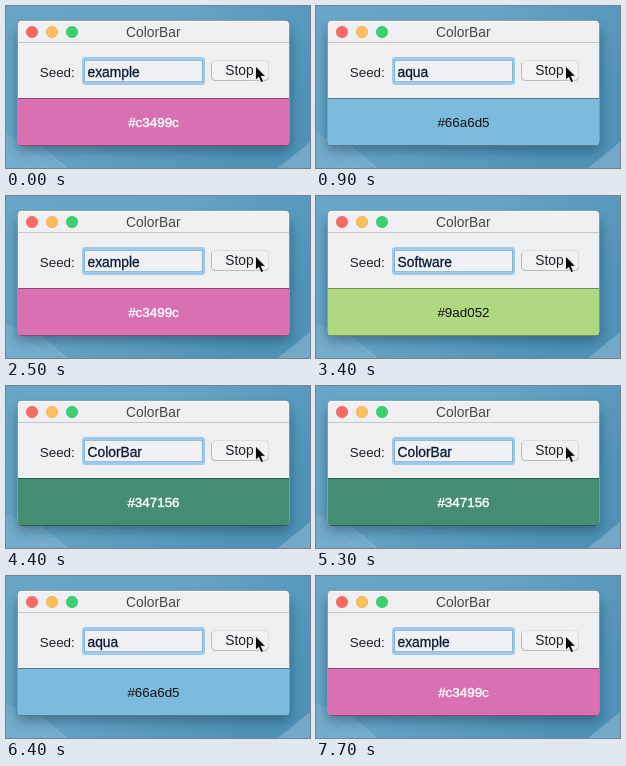
Animation, 304 px wide and 162 px high, one loop 8000 ms. Source, as an HTML page:

```html
<!DOCTYPE html>
<html lang="en">
<head>
<meta charset="utf-8">
<title>ColorBar</title>
<style>
  html, body { margin: 0; width: 100%; height: 100%; overflow: hidden; }
  svg { display: block; width: 100vw; height: 100vh; }
  text { font: 13.8px "Liberation Sans", Arial, sans-serif; fill: #202124; white-space: pre; }
  .mid { text-anchor: middle; }
  #seed { fill: #0a1c38; stroke: #0a1c38; stroke-width: .3; }
  #code { font-size: 13.4px; stroke-width: .4; }
</style>
</head>
<body>
<svg viewBox="0 0 304 162" preserveAspectRatio="none">
  <defs>
    <linearGradient id="sky" x1="0" y1="0" x2="1" y2=".5">
      <stop offset="0" stop-color="#69a5c6"/>
      <stop offset=".5" stop-color="#66a3c5"/>
      <stop offset="1" stop-color="#4f92b8"/>
    </linearGradient>
    <filter id="blur" x="-20%" y="-20%" width="140%" height="150%">
      <feGaussianBlur stdDeviation="6"/>
    </filter>
    <clipPath id="frame"><rect x="12" y="15" width="271" height="125" rx="4"/></clipPath>
    <clipPath id="inner"><rect x="79" y="54" width="116.5" height="22"/></clipPath>
  </defs>

  <rect width="304" height="162" fill="url(#sky)"/>
  <path d="M0 128L34 140 62 162H0z" fill="#8cbcd4" opacity=".35"/>
  <path d="M14 138L40 162M32 138L60 162" stroke="#a3cadd" opacity=".35"/>
  <path d="M272 162L304 136V162z" fill="#8cb8d0" opacity=".6"/>
  <rect x="11" y="23" width="273" height="122" rx="5" fill="#0b2b40" opacity=".42" filter="url(#blur)"/>

  <rect x="11.5" y="14.5" width="272" height="125" rx="4.5" fill="#eff0f2" stroke="#4f7184" stroke-opacity=".4"/>
  <g clip-path="url(#frame)">
    <rect x="12" y="15" width="271" height="21" fill="#f0f0f2"/>
    <path d="M12 15.5H283" stroke="#fafafb"/>
    <path d="M12 36.5H283" stroke="#c6c6c8"/>
    <rect id="bar" x="12" y="92" width="271" height="48"/>
    <path d="M12 92.5H283M12 139.5H283" stroke="#000" stroke-opacity=".35"/>
  </g>
  <g stroke-width=".6">
    <circle cx="26" cy="26" r="5.7" fill="#fc6965" stroke="#e45a56"/>
    <circle cx="46" cy="26" r="5.7" fill="#fcbf5a" stroke="#e2aa4c"/>
    <circle cx="66" cy="26" r="5.7" fill="#38d070" stroke="#2fba62"/>
  </g>
  <text class="mid" x="147.3" y="31" style="fill:#48484a">ColorBar</text>

  <text x="33.8" y="71" style="font-size:13.4px">Seed:</text>
  <rect x="77.5" y="52.5" width="120" height="25" rx="2" fill="#eff1f4" stroke="#9fcaec" stroke-width="3"/>
  <rect x="78.5" y="54.5" width="118" height="21" fill="none" stroke="#7fb0d6" stroke-width=".8"/>
  <text id="seed" x="81.5" y="71" clip-path="url(#inner)"></text>

  <rect x="205.5" y="54.5" width="57" height="20" rx="3.5" fill="#f2f2f4" stroke="#dededf"/>
  <path d="M205.5 57V71Q205.5 74.5 209 74.5H259Q262.5 74.5 262.5 71" fill="none" stroke="#bcbcbe"/>
  <text class="mid" x="233.5" y="69">Stop</text>
  <path d="M249.5 60V74.2L252.7 71.3 255 76.6 257.6 75.5 255.3 70.3H259.7z"
        fill="#080808" stroke="#fff" stroke-width=".8"/>

  <text id="code" class="mid" x="147.5" y="121"></text>
</svg>
<script>
  const LOOP = 8000;
  const $ = id => document.getElementById(id);

  // name: [seed text, label, bar colour, label colour]
  const looks = {
    example: ["example", "#c3499c", "#d970b1", "#fff"],
    from: ["From", "#3f6605", "#557f28", "#fff"],
    software: ["Software", "#9ad052", "#afd980", "#111"],
    colorBar: ["ColorBar", "#347156", "#458d73", "#fff"],
    long: ["pneumonoultramicroscopic", "#3ac743", "#36d374", "#111"],
    aqua: ["aqua", "#66a6d5", "#7dbbdd", "#111"]
  };
  const steps = [
    [0, "example"], [500, "aqua"], [1500, "from"], [2400, "example"],
    [3400, "software"], [4400, "colorBar"], [5400, "long"],
    [6400, "aqua"], [7400, "example"]
  ];

  let shown;
  function draw(t) {
    const name = steps.filter(s => s[0] <= t).pop()[1];
    if (name === shown) return;
    shown = name;
    const [seed, code, color, ink] = looks[name];
    const label = $("code");
    $("seed").textContent = seed;
    label.textContent = code;
    label.style.fill = ink;
    label.style.stroke = ink === "#fff" ? ink : "none";
    $("bar").setAttribute("fill", color);
  }

  const start = performance.now();
  function tick() {
    draw((performance.now() - start) % LOOP);
    requestAnimationFrame(tick);
  }
  tick();
</script>
</body>
</html>
```
